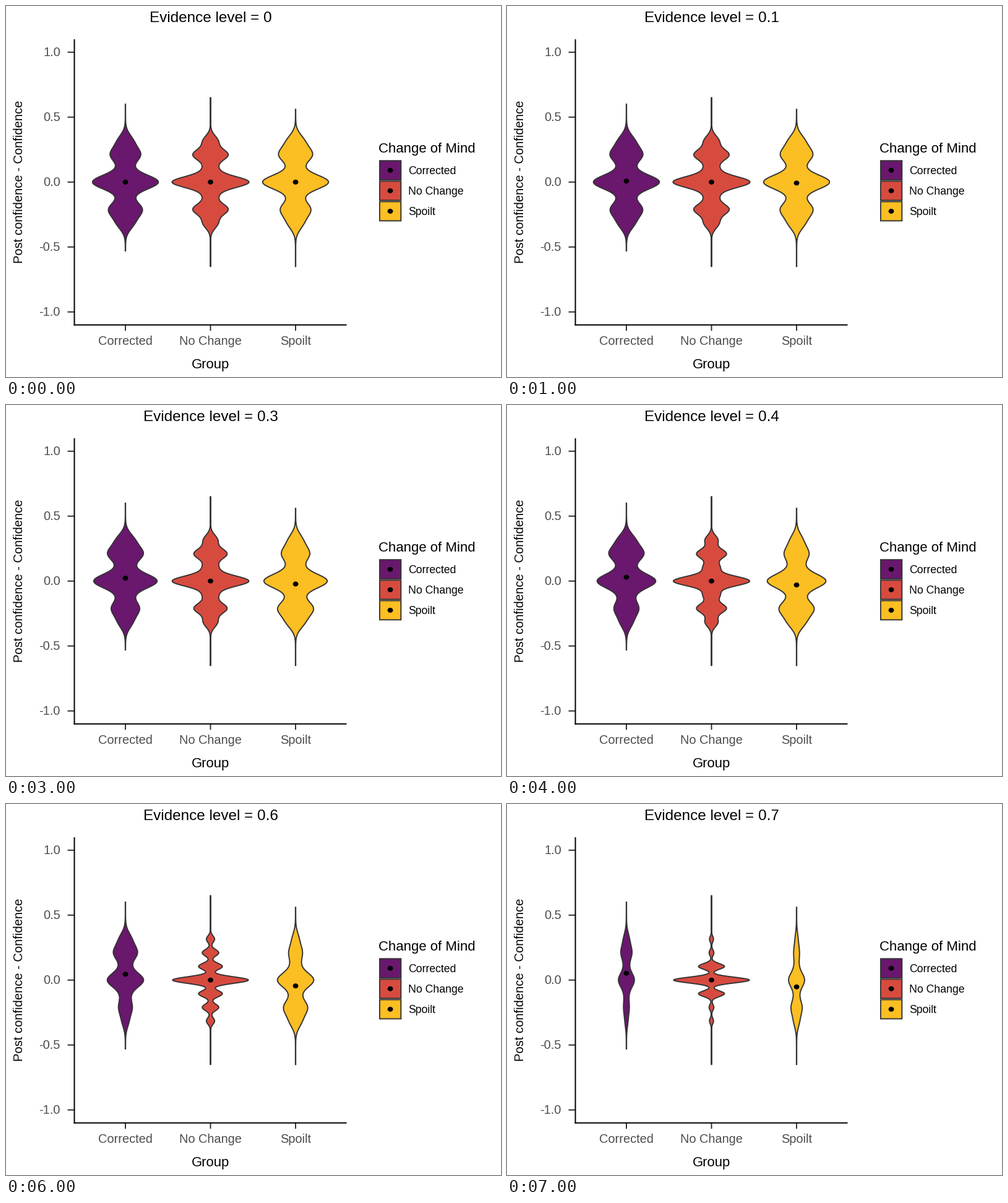
Animation, 800 px wide and 600 px high, one loop 8000 ms. Source, as a matplotlib script:

```python
import matplotlib.pyplot as plt
import numpy as np
from matplotlib.animation import FuncAnimation
from matplotlib.patches import Ellipse, Polygon, Rectangle

DPI = 100
PX = 72 / DPI
Y0, UNIT = 284.75, 210
LEFT, RIGHT, BASE = 110.5, 550.5, Y0 + 1.1 * UNIT
INK, GREY = "#333333", "#4d4d4d"
STEPS = 8
RATING = 0.105  # spacing of the confidence ratings

plt.rcParams["font.family"] = "Liberation Sans"
plt.rcParams["path.snap"] = False

# name, centre x, colour, drift of the mean with evidence, lower and upper end
GROUPS = [
    ("Corrected", 193, "#6a176e", 1, -0.53, 0.6),
    ("No Change", 330.5, "#d74b3f", 0, -0.65, 0.65),
    ("Spoilt", 468, "#fbbe23", -1, -0.65, 0.56),
]


def shape_rule(evidence, drift):
    """Peak half-width, bandwidth and side weights for 1, 2, 3 ratings away."""
    fade = 1 - (evidence / 0.7) ** 3.3
    if drift == 0:
        sharp = fade ** 2
        sides = (0.34 - 0.18 * sharp, 0.06 + 0.39 * fade, 0.05 + 0.14 * fade)
        return 61, 0.022 + 0.021 * sharp, sides, sides
    near = 0.13 + 0.1 * evidence
    grow, shrink = 0.43 + 0.33 * evidence, 0.48 - 0.22 * evidence
    up, down = (grow, shrink) if drift > 0 else (shrink, grow)
    return (12 + 39 * fade, 0.054,
            (near, up, up / 2), (near, down, down / 2))


def half_width(v, evidence, drift):
    """Violin half-width in px: a sum of Gaussian bumps at the ratings."""
    peak, band, up, down = shape_rule(evidence, drift)
    weights = [*down[::-1], 1, *up]
    return 0.2 + peak * sum(
        w * np.exp(-0.5 * ((v - k * RATING) / band) ** 2)
        for k, w in zip(range(-3, 4), weights))


def outline(cx, evidence, drift, low, high):
    v = np.linspace(high, low, 400)
    half, y = half_width(v, evidence, drift), Y0 - v * UNIT
    left = np.column_stack([cx - half, y])
    right = np.column_stack([cx + half, y])
    return np.vstack([left, right[::-1]])


fig = plt.figure(figsize=(800 / DPI, 600 / DPI), dpi=DPI, facecolor="white")
ax = fig.add_axes([0, 0, 1, 1])
ax.set(xlim=(0, 800), ylim=(600, 0))
ax.axis("off")


def label(x, y, text, size, color="black", ha="center", **kw):
    return ax.text(x, y, text, fontsize=size * PX, color=color, ha=ha,
                   va="baseline", **kw)


def line(xs, ys, color):
    ax.plot(xs, ys, color=color, lw=2 * PX, solid_capstyle="butt")


def dot(x, y):
    return ax.add_patch(Ellipse((x, y), 8.8, 8, fc="black", ec="none", zorder=4))


# Axes
for v in (1, 0.5, 0, -0.5, -1):
    y = Y0 - v * UNIT
    line([LEFT - 11, LEFT], [y, y], INK)
    label(87.8, y + 6.3, f"{v:.1f}", 20, GREY, "right")
for name, cx, *_ in GROUPS:
    line([cx, cx], [BASE, BASE + 9.5], INK)
    label(cx, 548, name, 20, GREY)
line([LEFT, LEFT], [Y0 - 1.1 * UNIT, BASE + 1], "black")
line([LEFT - 1, RIGHT], [BASE, BASE], "black")
label(330.5, 586, "Group", 22.1)
label(27, Y0 - 0.5, "Post confidence - Confidence", 20.1,
      rotation=90, rotation_mode="anchor")
title = label(330.5, 26, "", 24.3)

# Legend
label(602, 237, "Change of Mind", 22.1, ha="left")
for i, (name, _, color, *_) in enumerate(GROUPS):
    y = 265.7 + 33.1 * i
    ax.add_patch(Rectangle((603.9, y - 15.5), 34.4, 31, fc=color, ec=INK,
                           lw=1.9 * PX, zorder=3))
    dot(621, y)
    label(650, y + 6, name, 17.6, ha="left")

# Violins
violins, means = [], []
for _, cx, color, drift, low, high in GROUPS:
    shape = Polygon(outline(cx, 0, drift, low, high), closed=True, fc=color,
                    ec=INK, lw=1.9 * PX, joinstyle="miter", zorder=3)
    violins.append(ax.add_patch(shape))
    means.append(dot(cx, Y0))


def update(step):
    evidence = step / 10
    title.set_text(f"Evidence level = {evidence:g}")
    for group, shape, mean in zip(GROUPS, violins, means):
        _, cx, _, drift, low, high = group
        shape.set_xy(outline(cx, evidence, drift, low, high))
        mean.set_center((cx, Y0 - 0.075 * drift * evidence * UNIT))
    return [title, *violins, *means]


anim = FuncAnimation(fig, update, frames=STEPS, interval=1000, repeat=True,
                     repeat_delay=0, blit=False)
plt.show()
```
